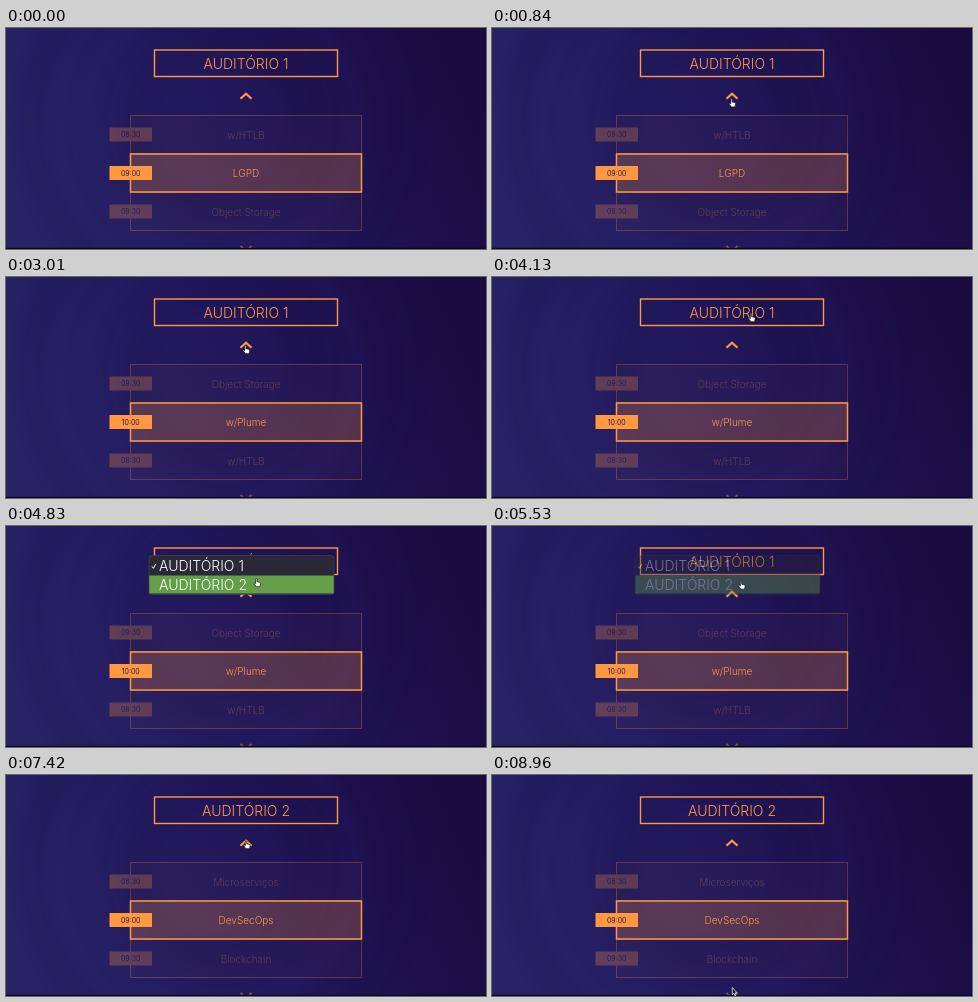
An HTML page that plays this animation: 480x221 px, repeating every 9.03 s.

```html
<!DOCTYPE html>
<html lang="pt-BR">
<head>
<meta charset="utf-8">
<title>Auditórios</title>
<style>
  html, body { margin: 0; width: 100%; height: 100%; overflow: hidden; background: #211858; }
  svg { display: block; width: 100vw; height: 100vh; }
  text { font-family: Inter, Roboto, sans-serif; font-weight: 300; }
  .mid { text-anchor: middle; }
  .title, .option { font-size: 14px; }
  .item { font-size: 10px; fill: #ff9840; }
  .time { font-size: 7px; font-weight: 400; fill: #2a1750; }
  .line { fill: none; stroke: #ff9840; }
</style>
</head>
<body>
<svg viewBox="0 0 480 221" preserveAspectRatio="none">
  <defs>
    <linearGradient id="night" x1="0" y1=".6" x2="1" y2=".4">
      <stop offset="0" stop-color="#292365"/>
      <stop offset=".5" stop-color="#21175a"/>
      <stop offset="1" stop-color="#1a0b40"/>
    </linearGradient>
    <filter id="soft" x="-20%" y="-20%" width="140%" height="140%"><feGaussianBlur stdDeviation="8"/></filter>
  </defs>
  <rect width="480" height="221" fill="url(#night)"/>
  <g fill="none" stroke-width="14" filter="url(#soft)" opacity=".22">
    <circle cx="215" cy="95" r="190" stroke="#160a45"/>
    <circle cx="215" cy="95" r="135" stroke="#2c2478"/>
    <circle cx="215" cy="95" r="85" stroke="#160a45"/>
  </g>

  <rect class="line" x="148.5" y="22" width="183" height="26.5" stroke-width="1.4"/>
  <text id="title" class="title mid" x="240" y="41" fill="#ff9840"></text>
  <path class="line" d="M234.5 70.8L240 65.8L245.5 70.8" stroke-width="2.2"/>
  <path class="line" d="M234.5 218L240 223.5L245.5 218" stroke-width="2" opacity=".45"/>
  <g id="slots"></g>

  <g id="menu">
    <rect x="143" y="29.5" width="185" height="39" rx="3" fill="#2b2838" stroke="#49465a" stroke-width=".6"/>
    <rect id="hover" x="143.3" width="184.4" height="18" fill="#629f48"/>
    <path d="M146 40.5l1.4 1.8l2.4-4.4" fill="none" stroke="#fff" stroke-width="1"/>
    <g fill="#fff">
      <text class="option" x="153" y="45">AUDITÓRIO 1</text>
      <text class="option" x="153" y="63.5">AUDITÓRIO 2</text>
    </g>
  </g>

  <rect y="219.8" width="480" height="1.2" fill="#0b0820"/>
  <g id="cursor" stroke-linejoin="round">
    <path id="hand" fill="#fff" stroke="#111" stroke-width=".7"
      d="M-1.7 1V-3.4Q-1-4.5-.3-3.4V-.8L2.2-.2Q3.3.2 3.2 1.2L2.5 4.2H-1.1L-3.5 1Q-3.1 0-1.7 1Z"/>
    <path id="pointer" fill="#111" stroke="#fff" stroke-width=".7"
      d="M-1.2-4V3.2L.4 1.8L1.5 4.2L2.5 3.7L1.5 1.4H3.6Z"/>
  </g>
</svg>
<script>
const LOOP = 9030;
const MENU_OPEN = 4500, MENU_FADE = 5420, MENU_GONE = 5600;

const rooms = {
  first: [['08:30', 'w/HTLB'], ['09:00', 'LGPD'], ['09:30', 'Object Storage'], ['10:00', 'w/Plume']],
  second: [['08:30', 'Microserviços'], ['09:00', 'DevSecOps'], ['09:30', 'Blockchain']]
};

// start time, title, talks, index of the highlighted talk
const states = [
  [0, 'AUDITÓRIO 1', rooms.first, 1],
  [1190, 'AUDITÓRIO 1', rooms.first, 0],
  [2590, 'AUDITÓRIO 1', rooms.first, 3],
  [5600, 'AUDITÓRIO 2', rooms.second, 1]
];

// time, x, y
const cursorPath = [
  [0, 241, 230], [70, 241, 230], [900, 240.5, 72.5], [3620, 240.5, 72.5],
  [4120, 260, 40.5], [4520, 260, 40.5], [4800, 251.5, 56.5], [5500, 250, 59],
  [5700, 250, 59], [6250, 241, 69.5], [8430, 241, 69.5], [8920, 241.5, 216.5], [LOOP, 241.5, 216.5]
];

const $ = id => document.getElementById(id);

$('slots').innerHTML = [106.5, 145, 183.5].map((y, i) => {
  const active = i === 1;
  return `<g opacity="${active ? 1 : .27}">
    <rect x="124.5" y="${y - 19}" width="231" height="38" fill="#ff9840"
      fill-opacity="${active ? .24 : .1}" stroke="#ff9840" stroke-width="${active ? 1.5 : 1}"/>
    <rect x="103.5" y="${y - 7}" width="42.5" height="14" fill="#ff9840"/>
    <text class="time mid" x="124.7" y="${y + 2.5}"></text>
    <text class="item mid" x="240" y="${y + 4}"></text>
  </g>`;
}).join('');
const slots = [...$('slots').children].map(g => g.querySelectorAll('text'));

const ease = p => p * p * (3 - 2 * p);
const show = (node, visible) => node.setAttribute('visibility', visible ? 'visible' : 'hidden');

function cursorAt(t) {
  const i = cursorPath.findIndex(point => point[0] > t);
  const [t0, x0, y0] = cursorPath[i - 1], [t1, x1, y1] = cursorPath[i];
  const p = ease((t - t0) / (t1 - t0));
  return [x0 + (x1 - x0) * p, y0 + (y1 - y0) * p];
}

function draw(t) {
  const [, title, talks, current] = states.findLast(state => state[0] <= t);
  $('title').textContent = title;
  slots.forEach(([time, name], i) => {
    const talk = talks[(current + i - 1 + talks.length) % talks.length];
    [time.textContent, name.textContent] = talk;
  });

  const [x, y] = cursorAt(t);
  const overControl = y < 78;
  $('cursor').setAttribute('transform', `translate(${x} ${y})`);
  show($('hand'), overControl);
  show($('pointer'), !overControl);

  const fade = Math.min(1, (MENU_GONE - t) / (MENU_GONE - MENU_FADE));
  $('menu').setAttribute('opacity', t < MENU_OPEN ? 0 : Math.max(0, fade));
  $('hover').setAttribute('y', y < 49 ? 31 : 49.5);
}

function tick(now) {
  draw(now % LOOP);
  requestAnimationFrame(tick);
}
draw(0);
requestAnimationFrame(tick);
</script>
</body>
</html>
```
